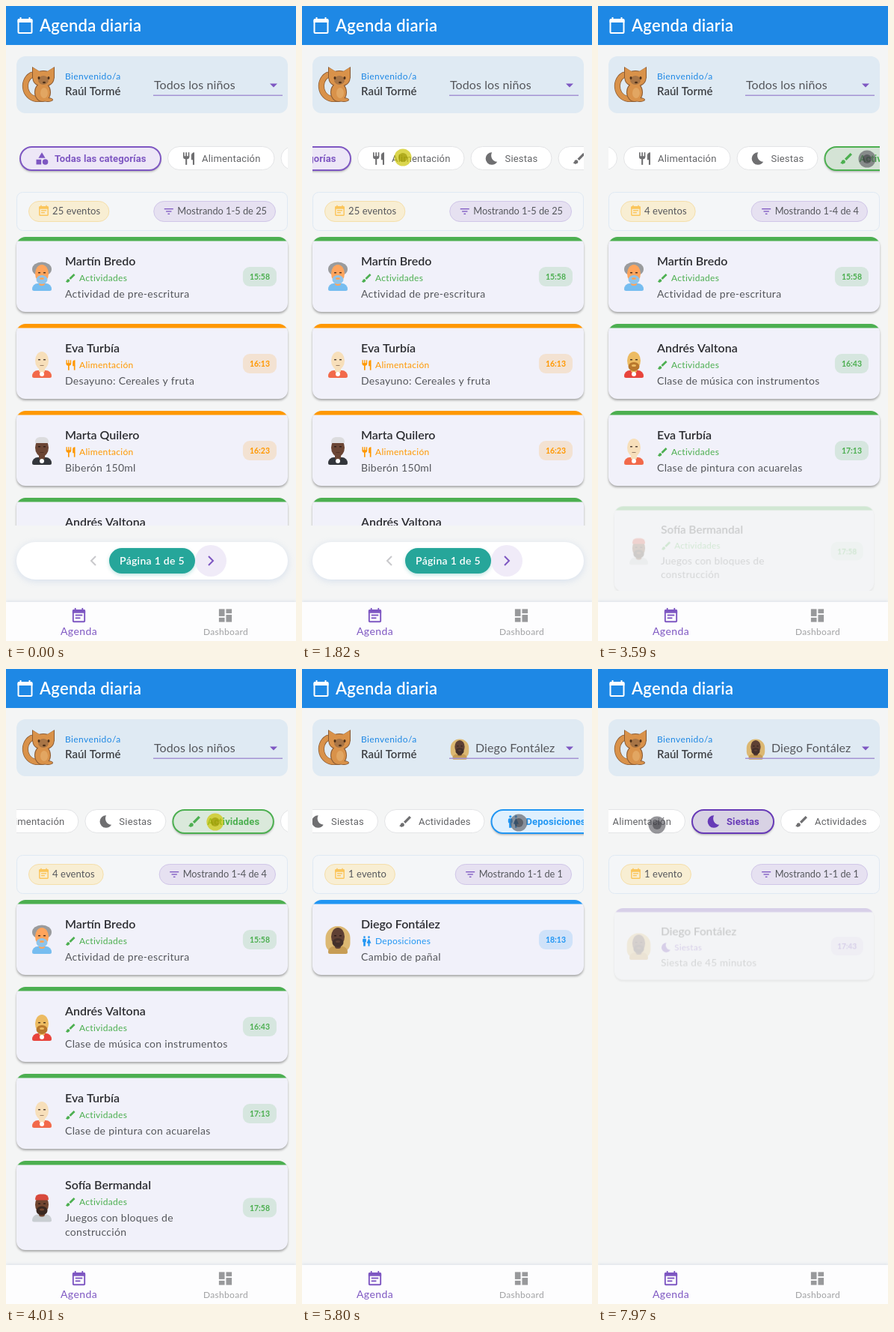
Animation of 388x847 px, one loop 8 s. Source, as an HTML page with a canvas:

```html
<!DOCTYPE html>
<html lang="es">
<head>
<meta charset="utf-8">
<title>Agenda diaria</title>
<style>
html, body { margin: 0; width: 100%; height: 100%; overflow: hidden; background: #f4f5f5; }
canvas { display: block; width: 388px; height: 847px; }
</style>
</head>
<body>
<canvas id="c"></canvas>
<script>
const W = 388, H = 847, LOOP = 8000, PAGE = 5;
const dpr = window.devicePixelRatio || 1;
const stage = document.getElementById('c');
const layer = document.createElement('canvas');
for (const c of [stage, layer]) {
  c.width = W * dpr;
  c.height = H * dpr;
}
let g = stage.getContext('2d');

const LATO = 'Lato, "Open Sans", sans-serif';
const ROBOTO = 'Roboto, "Liberation Sans", sans-serif';
const PURPLE = '#7e57c2', INK = '#55575c';

const clamp = v => Math.max(0, Math.min(1, v));
const ramp = (t, a, d) => clamp((t - a) / d);
const ease = p => p * p * (3 - 2 * p);
const mix = (a, b, p) => a + (b - a) * p;

// ---------- drawing helpers ----------
function setFont(size, weight, ls, fam = LATO) {
  g.font = `${weight} ${size}px ${fam}`;
  g.letterSpacing = ls + 'px';
}
function txt(s, x, y, size, color, weight = 400, ls = 0, align = 'left', fam = LATO) {
  setFont(size, weight, ls, fam);
  g.textAlign = align;
  g.fillStyle = color;
  g.fillText(s, x, y);
}
function widthOf(s, size, weight, ls) {
  setFont(size, weight, ls);
  return g.measureText(s).width;
}
function box(x, y, w, h, r, fill, stroke, lw = 1) {
  g.beginPath();
  g.roundRect(x, y, w, h, r);
  if (fill) { g.fillStyle = fill; g.fill(); }
  if (stroke) { g.strokeStyle = stroke; g.lineWidth = lw; g.stroke(); }
}
function oval(x, y, rx, ry, fill) {
  g.beginPath();
  g.ellipse(x, y, rx, ry, 0, 0, Math.PI * 2);
  g.fillStyle = fill;
  g.fill();
}
function path(points) {
  g.beginPath();
  for (let i = 0; i < points.length; i += 2) g.lineTo(points[i], points[i + 1]);
}
function poly(fill, ...points) {
  path(points);
  g.fillStyle = fill;
  g.fill();
}
function line(color, lw, ...points) {
  path(points);
  g.strokeStyle = color;
  g.lineWidth = lw;
  g.stroke();
}
function shadow(color, blur, dy) {
  g.shadowColor = color;
  g.shadowBlur = blur * dpr;
  g.shadowOffsetY = dy * dpr;
}
function noShadow() { shadow('transparent', 0, 0); }
function clipTo(x, y, w, h, r = 0) {
  g.beginPath();
  g.roundRect(x, y, w, h, r);
  g.clip();
}
function at(x, y, k, paint) {
  g.save();
  g.translate(x, y);
  g.scale(k, k);
  paint();
  g.restore();
}
// paints to a layer first, so that its parts fade as one
function faded(alpha, paint) {
  const main = g;
  g = layer.getContext('2d');
  g.setTransform(dpr, 0, 0, dpr, 0, 0);
  g.clearRect(0, 0, W, H);
  paint();
  g = main;
  g.save();
  g.globalAlpha *= alpha;
  g.drawImage(layer, 0, 0, W, H);
  g.restore();
}

// ---------- icons on a 24 unit grid ----------
function calendar(c, x, size) {
  box(x + 1, 4, size - 2, size - 2, 1, null, c, 2);
  box(x, 3, size, 5, [2, 2, 0, 0], c);
  for (const peg of [x + 3, x + size - 5]) box(peg, 1, 2, 3, 0, c);
}
const ICON = {
  all(c) {
    poly(c, 12, 2, 17.5, 11, 6.5, 11);
    oval(17.5, 17.5, 4.5, 4.5, c);
    box(3, 13.5, 8, 8, 0, c);
  },
  food(c) {
    for (let x = 3; x < 12; x += 4) box(x, 2, 2, 7, 0, c);
    box(3, 8, 10, 5, [0, 0, 4, 4], c);
    box(6.75, 12, 2.5, 10, 0, c);
    box(16, 2, 5, 12, [5, 0, 0, 0], c);
    box(18.5, 13, 2.5, 9, 0, c);
  },
  nap(c) {
    g.beginPath();
    g.arc(12, 12, 10, -1.54, 0.53, true);
    g.bezierCurveTo(13, 16.7, 8.6, 8.6, 12.3, 2);
    g.fillStyle = c;
    g.fill();
  },
  brush(c) {
    oval(7, 17, 3, 3, c);
    poly(c, 4, 17, 2, 19, 6, 21, 8, 19);
    line(c, 4, 10.4, 13.6, 19.6, 4.4);
  },
  wc(c) {
    for (const x of [7.5, 16.5]) oval(x, 4, 2, 2, c);
    box(4, 7, 7, 7.5, 2, c);
    box(5.5, 14, 4, 8, 0, c);
    poly(c, 16, 7, 17, 7, 21, 16, 12, 16);
    box(15, 15, 3, 7, 0, c);
  },
  today(c) { calendar(c, 2, 20); },
  note(c) {
    calendar(c, 3, 18);
    box(7, 10, 10, 2, 0, c);
    box(7, 14, 7, 2, 0, c);
  },
  busy(c) {
    calendar(c, 3, 18);
    for (const d of [-3, 3]) line(c, 1.5, 11.75 - d, 10.5, 11.75 + d, 16.5);
  },
  filter(c) {
    for (let i = 0; i < 3; i++) box(3 + 3.5 * i, 6 + 5 * i, 18 - 7 * i, 2, 0, c);
  },
  dash(c) {
    for (const [x, split] of [[3, 13], [13, 9]]) {
      box(x, 3, 8, split - 3, 0, c);
      box(x, split + 2, 8, 19 - split, 0, c);
    }
  }
};
function icon(name, x, y, size, color) { at(x, y, size / 24, () => ICON[name](color)); }

// ---------- data ----------
// label, icon, rgb, chip width when idle
const CATS = [
  ['Todas las categorías', 'all', '126,87,194', 188],
  ['Alimentación', 'food', '255,152,0', 143.5],
  ['Siestas', 'nap', '103,58,183', 109],
  ['Actividades', 'brush', '76,175,80', 134.5],
  ['Deposiciones', 'wc', '33,150,243', 148]
];
const [ALL, FOOD, NAP, PLAY, WC] = CATS.keys();

// skin, shirt, hair or beard
const KIDS = [
  { name: 'Martín Bredo', skin: '#ffa45c', shirt: '#76bdf0', hair: '#9a9b9d', beard: '#8fc4ea' },
  { name: 'Eva Turbía', skin: '#f7dfba', shirt: '#f2694a', badge: '#fff' },
  { name: 'Marta Quilero', skin: '#6b4534', shirt: '#33363b', cap: '#dcdcde', badge: '#fff' },
  { name: 'Andrés Valtona', skin: '#ecbb62', shirt: '#e8443c', beard: '#b9782c', badge: '#fff' },
  { name: 'Sofía Bermandal', skin: '#70452f', shirt: '#c9ced2', cap: '#d8493c', beard: '#3a2820' },
  { name: 'Diego Fontález', skin: '#5e4034', shirt: '#c79d55', long: '#dcb872', beard: '#43302a' }
];
const [DANI, EVA, MARTA, ANDRES, SOFIA, DIEGO] = KIDS.keys();

const EVENTS = [
  [DANI, PLAY, '15:58', 'Actividad de pre-escritura'],
  [EVA, FOOD, '16:13', 'Desayuno: Cereales y fruta'],
  [MARTA, FOOD, '16:23', 'Biberón 150ml'],
  [ANDRES, PLAY, '16:43', 'Clase de música con instrumentos'],
  [MARTA, WC, '16:53', 'Cambio de pañal'],
  [EVA, PLAY, '17:13', 'Clase de pintura con acuarelas'],
  [SOFIA, FOOD, '17:23', 'Almuerzo: Pollo con arroz'],
  [DIEGO, NAP, '17:43', 'Siesta de 45 minutos'],
  [SOFIA, PLAY, '17:58', 'Juegos con bloques de', 'construcción'],
  [DIEGO, WC, '18:13', 'Cambio de pañal'],
  [EVA, WC, '18:58', 'Lavado de manos antes del', 'almuerzo']
];

// ---------- gestures ----------
const TRAVEL = 270, CLICK = 70;
const moves = [], presses = [];
const states = [{ t: 0, sel: ALL, kid: -1, since: {}, kept: PAGE }];
let now = { t: 530, x: 371, y: 113, scroll: 0 };

function moveTo(from, to, x, y, scroll = now.scroll) {
  const next = { t: to, x, y, scroll };
  moves.push({ from, a: now, b: next });
  now = next;
}
function hover(t, x, y) { moveTo(Math.max(now.t, t - TRAVEL), t, x, y); }
function press(a, b) {
  presses.push([a, b]);
  now = { ...now, t: b };
}
function drag(t, x, y, dx, time) {
  hover(t, x, y);
  moveTo(t, t + time, x + dx, y, now.scroll - dx);
  press(t - CLICK, t + time + CLICK);
}
function tap(t, x, y, change) {
  hover(t, x, y);
  press(t, t + CLICK);
  const last = states[states.length - 1], since = { ...last.since };
  for (const k in change) since[k] = now.t;
  states.push({ ...last, ...change, t: now.t, since, kept: rowsOf(last).length });
}
function rowsOf({ sel, kid }) {
  return EVENTS.filter(e => (sel === ALL || e[1] === sel) && (kid < 0 || e[0] === kid)).slice(0, PAGE);
}

hover(800, 281, 134);
drag(1400, 277, 202, -142, 420);
tap(2210, 135, 202, { sel: FOOD });
hover(2960, 340, 206);
drag(3120, 376, 204, -38, 160);
tap(3400, 360, 204, { sel: PLAY });
drag(3900, 360, 204, -192.5, 250);
tap(4350, 300, 205, { sel: WC });
hover(4630, 300, 131);
tap(4770, 298, 112, { menu: true });
hover(5390, 285, 395);
tap(5590, 285, 395, { menu: false, kid: DIEGO });
hover(5800, 290, 205);
hover(6200, 222, 205);
tap(6340, 222, 205, { sel: PLAY });
drag(7220, 222, 205, 132, 200);
tap(7780, 182, 206, { sel: NAP });
hover(7970, 79, 208);

function track(t) {
  const m = moves.filter(v => v.from <= t).pop() || moves[0];
  const p = ease(ramp(t, m.from, m.b.t - m.from));
  return ['x', 'y', 'scroll'].map(k => mix(m.a[k], m.b[k], p));
}

// ---------- parts ----------
function avatar(id, x, y, k = 1) {
  const { skin, shirt, hair, beard, cap, long, badge } = KIDS[id];
  at(x, y, k, () => {
    if (long) box(-16.5, -17, 33, 35, [16, 16, 12, 12], long);
    if (hair) oval(0, -9, 13, 9.5, hair);
    box(-13, 10, 26, 10, [9, 9, 3, 3], shirt);
    box(-4, 4, 8, 9, 3, skin);
    oval(0, -3, 9, 12, skin);
    if (beard) {
      oval(0, 5, 7.5, 6, beard);
      oval(0, 3.5, 3, 1.5, skin);
    } else box(-2.5, 3, 5, 1, 0, 'rgba(60,30,20,.5)');
    if (cap) box(-9, -17, 18, 8, [8, 8, 2, 2], cap);
    if (badge) oval(0, 15, 3, 3, badge);
    for (const ex of [-5, 2]) box(ex, -5, 3, 1.5, 0, 'rgba(30,18,14,.75)');
  });
}

function pet() {
  const fur = '#d9924a', dark = '#8a5a32';
  g.lineCap = 'round';
  for (const [c, w] of [[dark, 8], [fur, 6.5]]) {
    g.beginPath();
    g.moveTo(46, 124);
    g.bezierCurveTo(24, 126, 20, 100, 34, 92);
    g.strokeStyle = c;
    g.lineWidth = w;
    g.stroke();
  }
  g.lineCap = 'butt';
  for (const [c, d] of [[dark, 1], [fur, 0]]) {
    oval(49, 115, 10 + d, 12 + d, c);
    oval(56, 125, 6 + d, 2 + d, c);
    for (const side of [-1, 1]) poly(c, 50 + side * (14 + d), 82 - d, 50 + side * 4, 88, 50 + side * (14 + d), 97);
    oval(50, 97, 13.5 + d, 10 + d, c);
  }
  oval(50, 99, 7, 6, '#a87546');
  for (const x of [44, 57]) oval(x, 96, 1.5, 2, '#4d3019');
  oval(51, 102, 2, 1.3, '#4d3019');
  oval(51, 116, 5, 7, '#e2a662');
}

function kidRow(kid, y) {
  if (kid < 0) return txt('Todos los niños', 198, y + 5, 16, INK, 400, 0.1);
  avatar(kid, 211, y, 0.74);
  txt(KIDS[kid].name, 232, y + 5, 16, INK, 400, 0.1);
}

function header(kid) {
  g.fillStyle = '#1e88e5';
  g.fillRect(0, 0, W, 52);
  icon('today', 13.5, 14, 24, '#fff');
  txt('Agenda diaria', 45, 34, 22, '#fff', 600, 0.25);
  box(14, 67, 363, 76, 12, '#dfeaf3');
  pet();
  txt('Bienvenido/a', 79, 98, 12, '#1e88e5', 400, 0.4);
  txt('Raúl Tormé', 79, 119, 15, '#3d3f43', 600);
  kidRow(kid, 106);
  box(197, 118.5, 173, 1.5, 0, '#a493d3');
  poly(PURPLE, 353, 103.5, 363, 103.5, 358, 108.5);
}

function chips(t, sel, since, scroll) {
  g.save();
  clipTo(14, 180, 363, 48);
  let x = 18 - scroll;
  CATS.forEach(([label, ic, rgb, idle], i) => {
    const on = i === sel, w = idle + (on ? 2 : 0), color = `rgb(${rgb})`;
    if (on) {
      shadow('rgba(0,0,0,.32)', 3, 2);
      box(x + 1, 188, w - 2, 31, 15.5, '#fff');
      noShadow();
      const hold = since ? 0.08 * (1 - ramp(t, since + 400, 400)) : 0;
      box(x + 1, 188, w - 2, 31, 15.5, `rgba(0,0,0,${hold})`);
      box(x + 1, 188, w - 2, 31, 15.5, `rgba(${rgb},.14)`, color, 2);
    } else box(x + 0.5, 187.5, w - 1, 31, 15.5, '#fff', '#e3e4e6');
    icon(ic, x + (on ? 20 : 18.5), 193.5, 20, on ? color : '#6f6f71');
    txt(label, x + (on ? 47 : 46), 208, 13, on ? color : '#636467', on ? 600 : 400, on ? 0.1 : 0.2, 'left', ROBOTO);
    x += w + 8;
  });
  g.restore();
}

function summary(total, shown) {
  box(14.5, 248.5, 362, 51, 8, '#f4f6f8', '#dfe9f3');
  const left = `${total} evento${total === 1 ? '' : 's'}`;
  const lw = widthOf(left, 13, 400, 0.1);
  box(30.5, 260.5, lw + 43, 27, 13.5, '#f8eed3', '#f5dfaa');
  icon('note', 42, 265, 17, '#fbc55a');
  txt(left, 62, 278, 13, INK, 400, 0.1);
  if (!total) return;
  const right = `Mostrando 1-${shown} de ${total}`;
  const rx = 349 - widthOf(right, 12.8, 400, 0);
  box(rx - 31.5, 260.5, 392 - rx, 27, 13.5, '#e6e1f1', '#d0c6e8');
  icon('filter', rx - 19.5, 266, 16, PURPLE);
  txt(right, rx, 278, 12.8, INK);
}

const cardHeight = e => 100 + 19 * (e.length - 4);

function card(e, y) {
  const [kid, cat, time, ...desc] = e;
  const h = cardHeight(e), mid = y + 3 + h / 2;
  const [label, ic, rgb] = CATS[cat], color = `rgb(${rgb})`;
  shadow('rgba(0,0,0,.32)', 3, 2);
  box(14, y, 363, h, 12, '#f1f1fa');
  noShadow();
  g.save();
  clipTo(14, y, 363, h, 12);
  box(14, y, 363, 5.5, 0, color);
  g.restore();
  avatar(kid, 48, mid - 1);
  txt(KIDS[kid].name, 79, y + 38, 16, '#2c2d31', 600);
  icon(ic, 78.5, y + 47, 16, color);
  txt(label, 98, y + 59, 12, color, 400, 0.3);
  desc.forEach((s, i) => txt(s, 79, y + 81 + 19 * i, 14, INK, 400, 0.3));
  const tw = widthOf(time, 10.5, 700, 0);
  box(362 - tw - 18, mid - 13, tw + 18, 26, 9, `rgba(${rgb},.16)`);
  txt(time, 353 - tw, mid + 4, 10.5, color, 700);
}

// rows beyond those already on screen rise and fade in
function list(rows, bottom, kept, p) {
  g.save();
  clipTo(0, 302, W, bottom - 302);
  let y = 308;
  rows.forEach((e, i) => {
    const h = cardHeight(e);
    if (i < kept || p === 1) card(e, y);
    else if (p > 0) {
      const k = mix(0.945, 1, p), cy = y + h / 2;
      at(195.5 * (1 - k), cy * (1 - k) + 11 * (1 - p), k, () => faded(p, () => card(e, y)));
    }
    y += h + 16;
  });
  g.restore();
}

function chevron(x, dir, color) { line(color, 2, x - 3 * dir, 734, x + 3 * dir, 740, x - 3 * dir, 746); }

function pager() {
  shadow('rgba(110,150,210,.22)', 10, 2);
  box(14, 715, 363, 50, 25, '#fff');
  shadow('rgba(38,166,154,.3)', 5, 2);
  box(138, 723, 115, 34, 17, '#26a69a');
  noShadow();
  txt('Página 1 de 5', 195.5, 745, 14, '#fff', 600, 0.3, 'center');
  oval(274, 740, 21, 21, '#f0ebf8');
  chevron(117, -1, '#c9c9cc');
  chevron(274, 1, PURPLE);
}

function empty(p) {
  shadow('rgba(110,150,210,.18)', 16, 3);
  box(40, 338, 311, 404, 16, '#fff');
  noShadow();
  const r = mix(39, 49, p);
  oval(195.5, 504, r, r, '#fff8e1');
  icon('busy', 164.5, 473.5, 62, '#ffd54f');
  txt('No hay eventos para mostrar', 195.5, 590, 20, PURPLE, 600, 0.5, 'center');
  txt('Prueba con otros filtros', 195.5, 620, 16, '#7b7c80', 400, 0.35, 'center');
}

function nav() {
  shadow('rgba(90,120,170,.16)', 4, -1);
  g.fillStyle = '#fdfdfe';
  g.fillRect(0, 795, W, 60);
  noShadow();
  icon('note', 86, 802, 23, PURPLE);
  txt('Agenda', 97.5, 839, 14, PURPLE, 400, 0.4, 'center');
  icon('dash', 282, 801.5, 23, '#98999b');
  txt('Dashboard', 294, 839, 12, '#a0a1a3', 400, 0.3, 'center');
}

function menu(t, open, since) {
  const p = open ? ramp(t, since, 300) : 1;
  const alpha = open ? clamp(p * 4) : 1 - ramp(t, since, 100);
  const h = mix(64, 352, ease(clamp(p * 2 - 0.5)));
  if (since && alpha) faded(alpha, () => {
    shadow('rgba(0,0,0,.3)', 10, 3);
    box(181, 75, 204, h, 4, '#fff');
    noShadow();
    g.save();
    clipTo(181, 75, 204, h);
    for (let kid = -1; kid < KIDS.length; kid++) kidRow(kid, 154 + 48 * kid);
    g.restore();
  });
}

function pointer(t, x, y) {
  if (t < moves[0].from) return;
  const down = presses.some(([a, b]) => t >= a && t < b);
  oval(x, y, 11.5, 11.5, down ? 'rgba(205,198,10,.72)' : 'rgba(85,85,92,.62)');
  oval(x, y, 6, 6, down ? 'rgba(150,145,0,.6)' : 'rgba(50,50,56,.5)');
}

function draw(t) {
  g.setTransform(dpr, 0, 0, dpr, 0, 0);
  g.fillStyle = '#f4f5f5';
  g.fillRect(0, 0, W, H);
  const [x, y, scroll] = track(t);
  const { sel, kid, since, kept, menu: open } = states.filter(s => s.t <= t).pop();
  const rows = rowsOf({ sel, kid }), paged = sel === ALL;

  header(kid);
  chips(t, sel, since.sel, scroll);
  summary(paged ? 25 : rows.length, rows.length);
  if (rows.length) list(rows, paged ? 693 : 780, kept, ramp(t, since.sel + 60, 300));
  else {
    const p = ease(ramp(t, since.sel, 550));
    faded(p, () => empty(p));
  }
  if (paged) pager();
  nav();
  menu(t, open, since.menu);
  pointer(t, x, y);
}

const start = performance.now();
function tick() {
  draw((performance.now() - start) % LOOP);
  requestAnimationFrame(tick);
}
tick();
</script>
</body>
</html>
```
